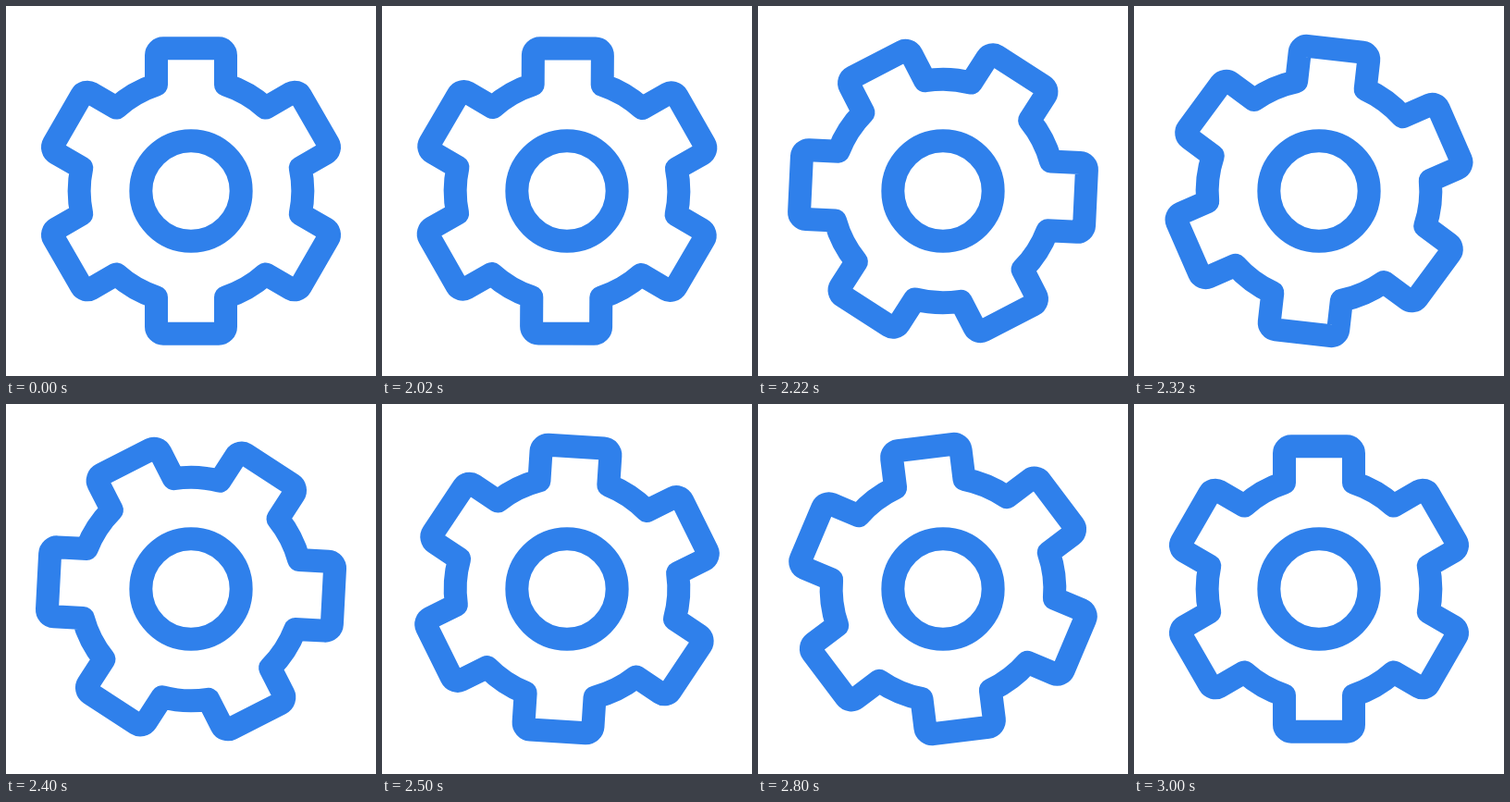
Recreate the animation shown at these times as an HTML page. Size 400 px wide and 400 px high, loop 3020 ms.

```html
<!DOCTYPE html>
<html lang="en">
<head>
<meta charset="utf-8">
<title>Turning gear</title>
<style>
  html, body { margin: 0; width: 100%; height: 100%; overflow: hidden; background: #fff; }
  svg { display: block; width: 100%; height: 100%; }
</style>
</head>
<body>
<svg viewBox="0 0 400 400">
  <g transform="translate(200 200)" fill="none" stroke="#2f80eb" stroke-width="25" stroke-linejoin="round">
    <path id="gear"/>
    <circle r="54.17"/>
  </g>
</svg>
<script>
const LOOP = 3020, START = 2000, DURATION = 1000, STEP = 25, TURN = 180;
const TEETH = 6, HALF_WIDTH = 37.5, TIP = 154.17, BODY = 120.83, CORNER = 7.5;
const gear = document.getElementById('gear');

function gearPath() {
  const root = Math.sqrt(BODY ** 2 - HALF_WIDTH ** 2);
  let d = '';
  for (let i = 0; i < TEETH; i++) {
    const a = i * 2 * Math.PI / TEETH, c = Math.cos(a), s = Math.sin(a);
    const at = (x, y) => `${(x * c - y * s).toFixed(2)} ${(x * s + y * c).toFixed(2)}`;
    const arc = r => `A${r} ${r} 0 0 1 `;
    const w = HALF_WIDTH, k = CORNER;
    d += (i ? arc(BODY) : 'M') + at(-w, -root)
      + 'L' + at(-w, k - TIP) + arc(k) + at(k - w, -TIP)
      + 'L' + at(w - k, -TIP) + arc(k) + at(w, k - TIP)
      + 'L' + at(w, -root);
  }
  return d + `A${BODY} ${BODY} 0 0 1 ${-HALF_WIDTH} ${-root.toFixed(2)}Z`;
}

// Cubic Bezier easing (x1, 0, x2, 1), solved by bisection.
function ease(p, x1 = 0.333, x2 = 0.377) {
  if (p <= 0 || p >= 1) return p <= 0 ? 0 : 1;
  let lo = 0, hi = 1;
  for (let i = 0; i < 30; i++) {
    const s = (lo + hi) / 2, q = 1 - s;
    if (3 * x1 * s * q * q + 3 * x2 * s * s * q + s ** 3 < p) lo = s; else hi = s;
  }
  return lo * lo * (3 - 2 * lo);
}

function draw(ms) {
  // The motion advances at 40 steps per second, on a 10 ms clock.
  const t = Math.floor((ms % LOOP + 5) / STEP) * STEP;
  const angle = TURN * ease((t - START) / DURATION);
  gear.setAttribute('transform', `rotate(${angle.toFixed(3)})`);
}

gear.setAttribute('d', gearPath());
const begin = performance.now();
function tick() {
  draw(performance.now() - begin);
  requestAnimationFrame(tick);
}
tick();
</script>
</body>
</html>
```
